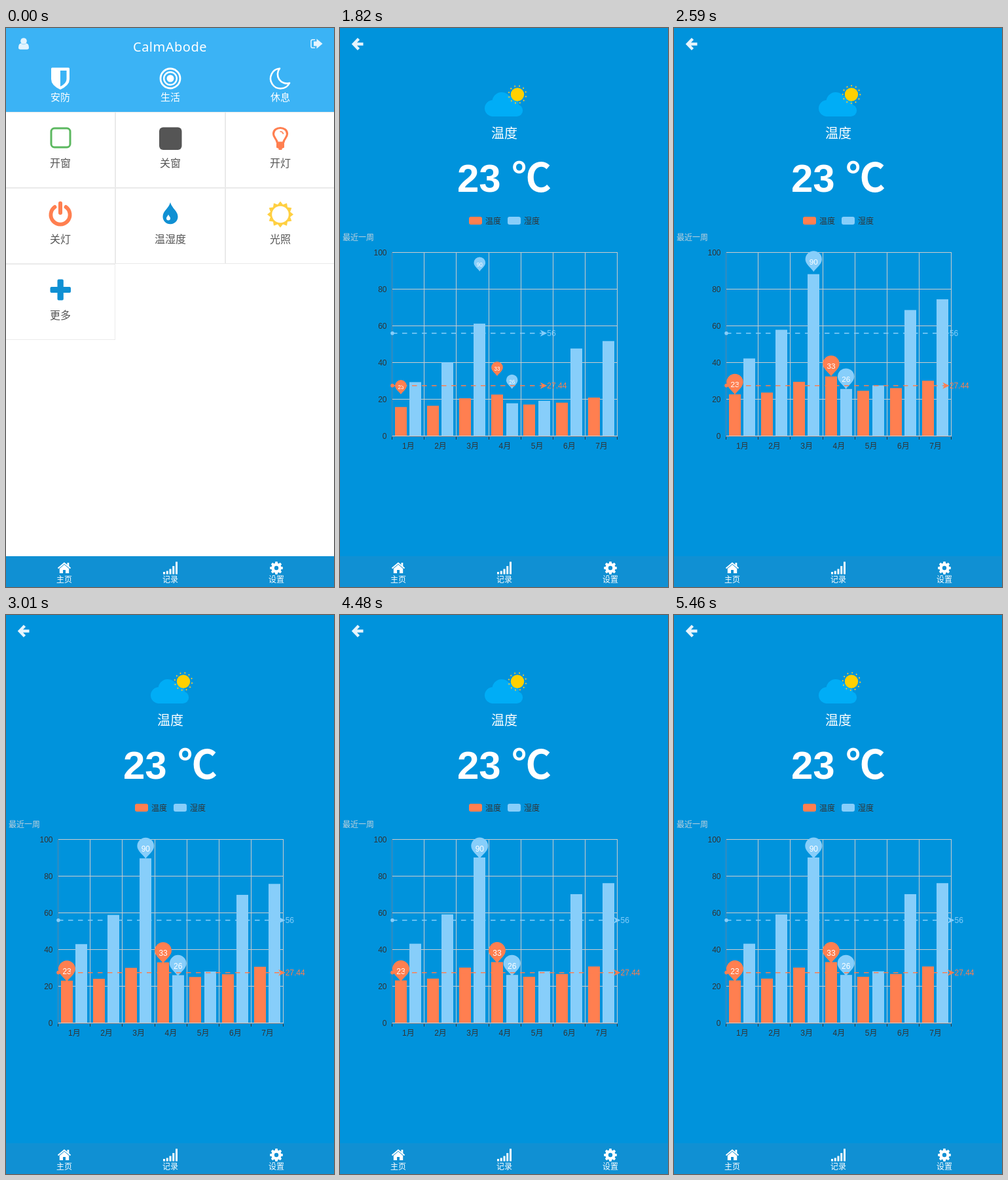
Animation of 501x853 px, one loop 5.53 s. Source, as an HTML page:

```html
<!DOCTYPE html>
<html lang="zh">
<head>
<meta charset="utf-8">
<title>CalmAbode</title>
<style>
  html, body { margin: 0; width: 100%; height: 100%; overflow: hidden; background: #fff; }
  svg { display: block; width: 501px; height: 853px; }
  text { font-family: "Liberation Sans", "Noto Sans CJK SC", sans-serif; font-weight: 350; font-size: 12px; }
  .mid { text-anchor: middle; }
  .white { fill: #fff; }
  .tile { fill: #fff; stroke: #eaeaea; }
  .label { font-size: 16px; fill: #555; }
  .scene { font-size: 15px; fill: #fff; }
  .axis { fill: #333; }
  .line { fill: none; stroke: #fff; stroke-width: 3; stroke-linejoin: round; }
</style>
</head>
<body>
<svg viewBox="0 0 501 853">
  <g id="home">
    <rect width="501" height="853" fill="#fff"/>
    <rect width="501" height="128" fill="#3bb3f5"/>
    <g fill="#e3f4fe">
      <circle cx="27" cy="20" r="4.8"/>
      <path d="M23 23.2Q27 27.4 31 23.2Q35 24 35 30Q35 32.8 32 32.8H22Q19 32.8 19 30Q19 24 23 23.2Z"/>
      <path d="M470 20.5H474.5V16.5L483.5 24L474.5 31.5V27.5H470Z"/>
      <path d="M472 17.7H468.5Q466 17.7 466 20V28Q466 30.3 468.5 30.3H472" fill="none" stroke="#e3f4fe" stroke-width="1.6"/>
    </g>
    <text class="mid white" x="250.5" y="36" style="font:400 20px 'Noto Sans',sans-serif;letter-spacing:.5px">CalmAbode</text>

    <path class="white" d="M70.5 60.5H95.5Q97 60.5 97 62V78Q97 87.5 83 94Q69 87.5 69 78V62Q69 60.5 70.5 60.5Z"/>
    <path d="M83 65H92.5V78Q92.5 84.5 83 89.2Z" fill="#3bb3f5"/>
    <circle class="line" cx="251" cy="77" r="15" style="stroke-width:2.8"/>
    <circle class="line" cx="251" cy="77" r="9.8" style="stroke-width:2.4"/>
    <circle class="white" cx="251" cy="77" r="5.5"/>
    <path class="line" d="M418 61.8A15.3 15.3 0 1 0 433 84A14 14 0 0 1 418 61.8Z" style="stroke-width:2.6"/>
    <text class="mid scene" x="83" y="111">安防</text>
    <text class="mid scene" x="251" y="111">生活</text>
    <text class="mid scene" x="419" y="111">休息</text>

    <g id="tiles"></g>
    <rect x="69" y="153" width="29" height="29" rx="5" fill="none" stroke="#5cb860" stroke-width="3"/>
    <rect x="234" y="151.5" width="34.5" height="34.5" rx="6" fill="#555"/>
    <g fill="none" stroke="#ff7f50" stroke-width="3.2">
      <path d="M414.2 175C414 169 408.5 168 408.5 161.5C408.5 149.5 429.5 149.5 429.5 161.5C429.5 168 424 169 423.8 175"/>
      <path d="M418.5 158Q423.2 158 423.4 162" stroke-width="1.7"/>
      <path d="M413 173.5H425V182.5L421.5 184V186H416.5V184L413 182.5Z" fill="#ff7f50" stroke="none"/>
      <path d="M74.5 273.1A14.6 14.6 0 1 0 91.5 273.1" stroke-width="5.8" stroke-linecap="round"/>
      <path d="M83 267.5V282" stroke-width="6" stroke-linecap="round"/>
    </g>
    <path d="M251 266C253.5 275.5 262.5 279 262.5 288A11.5 11.3 0 0 1 239.5 288C239.5 279 248.5 275.5 251 266Z" fill="#1090d3"/>
    <path class="white" d="M248 284.5C249 287.5 251 288 251 290.5A3 3 0 0 1 245 290.5C245 288 247 287.5 248 284.5Z"/>
    <path id="sunIcon" fill="#ffd042"/>
    <circle class="white" cx="419" cy="284.5" r="12.8"/>
    <path d="M69.5 395H78.5V385.5Q78.5 383.5 80.5 383.5H85.8Q87.8 383.5 87.8 385.5V395H97Q99 395 99 397V402Q99 404 97 404H87.8V413.5Q87.8 415.5 85.8 415.5H80.5Q78.5 415.5 78.5 413.5V404H69.5Q67.5 404 67.5 402V397Q67.5 395 69.5 395Z" fill="#1090d3"/>
  </g>

  <g id="detail">
    <rect width="501" height="853" fill="#0093dc"/>
    <path d="M28.5 16.5L20.8 24.5L28.5 32.5M21.5 24.5H35.5" fill="none" stroke="#e6f4fc" stroke-width="4.4"/>
    <g fill="#00adf6">
      <circle cx="233.5" cy="122.5" r="12.5"/>
      <circle cx="247" cy="112.5" r="14.5"/>
      <circle cx="259.5" cy="117" r="13.5"/>
      <circle cx="270" cy="125.8" r="9.2"/>
      <rect x="233" y="115" width="37" height="20"/>
    </g>
    <circle cx="271" cy="101.5" r="10.2" fill="#ffd000"/>
    <g id="rays" fill="#f5c832"></g>
    <text class="mid white" x="251" y="168" style="font-size:20px">温度</text>
    <text class="mid white" x="250.7" y="250" style="font-size:60px;font-weight:700">23 ℃</text>
    <rect x="197" y="288" width="20" height="12" rx="3" fill="#ff7f50"/>
    <text class="axis" x="222" y="298.5">温度</text>
    <rect x="256" y="288" width="20" height="12" rx="3" fill="#87cefa"/>
    <text class="axis" x="281" y="298.5">湿度</text>
    <text x="4" y="323.5" fill="#c4d3dc">最近一周</text>
    <g id="grid"></g>
    <g id="bars"></g>
    <g id="pins"></g>
    <g id="means"></g>
  </g>

  <rect y="806" width="501" height="47" fill="#1090d3"/>
  <g class="white">
    <path d="M89 818.8L96.2 825V831.5Q96.2 832 95.5 832H91V827H87V832H82.5Q81.8 832 81.8 831.5V825Z"/>
    <path d="M79.5 824.5L89 816.5L98.5 824.5" fill="none" stroke="#fff" stroke-width="2"/>
    <path d="M93.5 816H96.3V822L93.5 819.5Z"/>
    <g id="signal"></g>
    <g id="gear"></g>
    <circle cx="413" cy="824" r="3.2" fill="#1090d3"/>
    <text class="mid" x="89" y="846">主页</text>
    <text class="mid" x="251" y="846">记录</text>
    <text class="mid" x="413" y="846">设置</text>
  </g>
</svg>
<script>
const LOOP = 5530, OPEN = 1540, STEP = 70, GROW = 2000;
const ORANGE = '#ff7f50', BLUE = '#87cefa';
const BASE = 622.5, LEFT = 79.5, BAND = 49.2;
const el = id => document.getElementById(id);
const range = n => [...Array(n).keys()];
const fill = (id, parts) => { el(id).innerHTML = parts.join(''); };
const yOf = value => BASE - value * 2.8;
const rect = (x, y, w, h, attrs = '') => `<rect x="${x}" y="${y}" width="${w}" height="${h}" ${attrs}/>`;
const path = (d, attrs) => `<path d="${d}" ${attrs}/>`;
const text = (x, y, s, attrs) => `<text x="${x}" y="${y}" ${attrs}>${s}</text>`;

// Home screen
const columns = [[-.5, 167], [167.5, 167], [335.5, 167]];
fill('tiles', ['开窗', '关窗', '开灯', '关灯', '温湿度', '光照', '更多'].map((name, i) => {
  const [x, w] = columns[i % 3], y = 128.5 + 116 * Math.floor(i / 3);
  return rect(x, y, w, 115, 'class="tile"') +
    text(83 + 168 * (i % 3), y + 83, name, 'class="mid label"');
}));
el('sunIcon').setAttribute('d', 'M' + range(24).map(i => {
  const a = i * Math.PI / 12, r = i % 2 ? 15.6 : 20;
  return `${(419 + r * Math.sin(a)).toFixed(2)} ${(284.5 - r * Math.cos(a)).toFixed(2)}`;
}).join('L') + 'Z');

// Bottom bar
fill('signal', [3.5, 5, 8, 12.5, 19].map((h, i) => rect(240 + 4.75 * i, 833.5 - h, 3, h)));
fill('gear', ['<circle cx="413" cy="824" r="7.6"/>', ...range(8).map(i =>
  path('M410.7 818L411.3 814.2H414.7L415.3 818Z', `transform="rotate(${45 * i} 413 824)"`))]);

// Chart
fill('rays', range(12).map(i => `<circle cy="-13.3" r="1.1" transform="rotate(${30 * i})"/>`));
fill('grid', [
  ...range(6).map(i => path(`M80 ${BASE - 56 * i}H424`, 'stroke="#ccc"') +
    text(71.5, BASE - 56 * i + 4.2, 20 * i, 'class="axis" text-anchor="end"')),
  ...range(7).map(i => path(`M${Math.floor(LEFT + BAND * (i + 1)) + .5} 342V622`, 'stroke="#ccc"') +
    text(104.3 + BAND * i, 641.5, `${i + 1}月`, 'class="axis mid"')),
  path('M79.5 342V624', 'stroke="#5b86a8"'),
  path('M79 623.5H424', 'stroke="#5b7f9a"'),
  ...range(8).map(i => path(`M${Math.floor(LEFT + BAND * i) + .5} 624V628`, 'stroke="#333"'))
]);
const bars = (values, x, color) => values.map((v, i) =>
  rect(Math.floor(x + BAND * i), -v * 2.8, 18, v * 2.8, `fill="${color}"`));
fill('bars', [
  ...bars([23, 24, 30, 33, 25, 26.5, 30.6], 84, ORANGE),
  ...bars([43, 59, 90, 26, 28, 70, 76], 106.5, BLUE)
]);

const pins = [[93, 23, ORANGE], [240, 33, ORANGE], [213.3, 90, BLUE], [262.7, 26, BLUE]];
fill('pins', pins.map(([, value, color]) => '<g>' +
  path('M0 1.5C-3 -4 -13 -10 -13 -18A13 13 0 0 1 13 -18C13 -10 3 -4 0 1.5Z', `fill="${color}"`) +
  text(0, -10, value, 'class="mid white"') + '</g>'));

const means = [[27.44, ORANGE], [56, BLUE]];
fill('means', means.map(([value, color]) => `<g transform="translate(80 ${yOf(value)})" fill="${color}">` +
  '<circle r="2.8"/>' +
  path('', `class="reach" stroke="${color}" stroke-width="1.5" stroke-dasharray="7.5"`) +
  `<g class="tip">${path('M0 0L-10.5 -5L-7.5 0L-10.5 5Z', '')}${text(0, 4.3, value, '')}</g></g>`));

const pinNodes = [...el('pins').children];
const reaches = document.querySelectorAll('.reach');
const tips = document.querySelectorAll('.tip');

function draw(time) {
  const t = time % LOOP, open = t >= OPEN;
  el('home').style.display = open ? 'none' : '';
  el('detail').style.display = open ? '' : 'none';
  if (!open) return;
  const ms = Math.floor((t - OPEN) / STEP) * STEP;
  const k = Math.min(1, (ms + 47) / GROW);
  const grown = k === 1 ? 1 : 1 - 2 ** (-10 * k);
  el('rays').setAttribute('transform', `translate(271 101.5) rotate(${7 + ms * .0225})`);
  el('bars').setAttribute('transform', `translate(0 622) scale(1 ${grown})`);
  pinNodes.forEach((node, i) =>
    node.setAttribute('transform', `translate(${pins[i][0]} ${yOf(pins[i][1])}) scale(${grown})`));
  const x = 348.5 * grown;
  reaches.forEach(node => node.setAttribute('d', `M0 0H${x - 4}`));
  tips.forEach(node => node.setAttribute('transform', `translate(${x} 0)`));
}

const start = performance.now();
function tick() {
  draw(performance.now() - start);
  requestAnimationFrame(tick);
}
tick();
</script>
</body>
</html>
```
